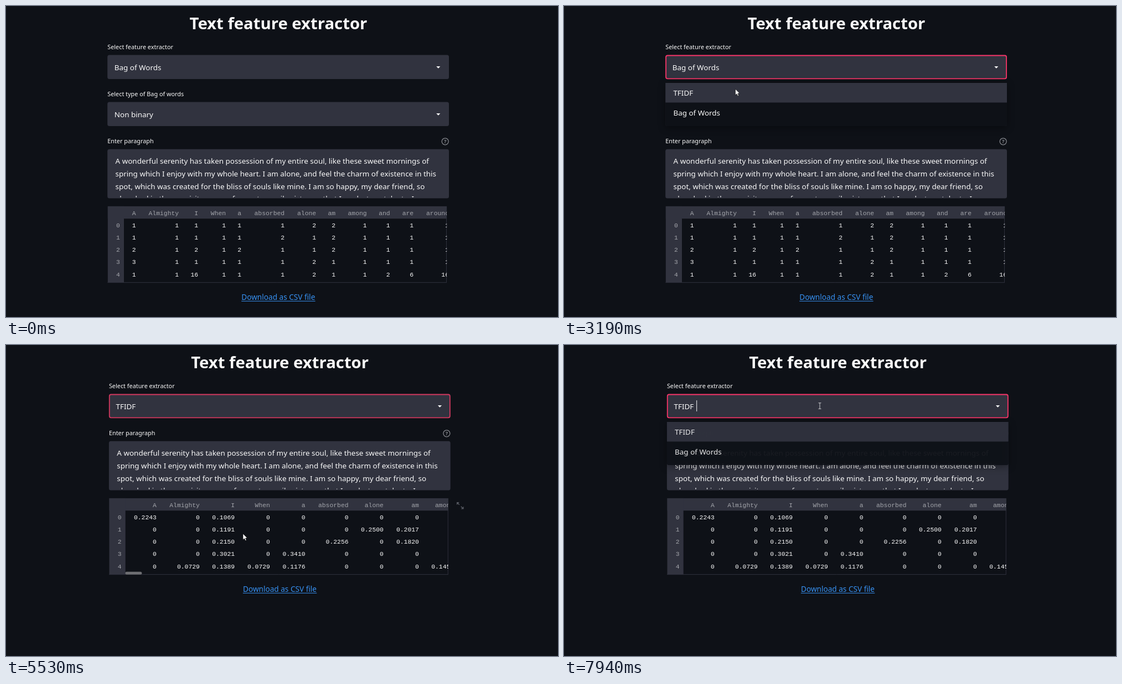
These frames come from a looping animation (997x562 px, 8000 ms). An HTML page with a canvas:

```html
<!DOCTYPE html>
<html lang="en">
<head>
<meta charset="utf-8">
<title>Text feature extractor</title>
<style>
html, body { margin: 0; width: 100%; height: 100%; overflow: hidden; background: #0e1117; }
canvas { display: block; }
</style>
</head>
<body>
<canvas id="stage" width="997" height="562"></canvas>
<script>
const ctx = document.getElementById('stage').getContext('2d');
const LOOP = 8000, LAYOUT_SWAP = 3980;
const SANS = '"Noto Sans", "Open Sans", sans-serif';
const MONO = '11.4px "Liberation Mono", "DejaVu Sans Mono", monospace';
const BODY = '13.45px ' + SANS, LABEL = '10.85px ' + SANS;
const BG = '#0e1117', PANEL = '#31333f', WHITE = '#fafafa', GREY = '#a3a5ab';

const paragraph = [
  'A wonderful serenity has taken possession of my entire soul, like these sweet mornings of',
  'spring which I enjoy with my whole heart. I am alone, and feel the charm of existence in this',
  'spot, which was created for the bliss of souls like mine. I am so happy, my dear friend, so',
  'absorbed in the exquisite sense of mere tranquil existence, that I neglect my talents. I'
];
const heads = 'A Almighty I When a absorbed alone am among and are around'.split(' ');

// Column right edges are relative to the left side of the page column.
const counts = {
  rights: [51.5, 129, 164, 214, 242, 320, 377, 412, 468.5, 510.5, 553, 616.8],
  rows: ['1 1 1 1 1 1 2 2 1 1 1 1', '1 1 1 1 1 2 1 2 1 1 1 1', '2 1 2 1 2 1 1 2 1 1 1 1',
         '3 1 1 1 1 1 2 1 1 1 1 1', '1 1 16 1 1 1 2 1 1 2 6 16'],
  thumb: 48
};
const weights = {
  rights: [86, 164, 227.3, 291, 354.7, 432.7, 496, 560, 623.3],
  rows: ['0.2243 0 0.1069 0 0 0 0 0 0', '0 0 0.1191 0 0 0 0.2500 0.2017 0',
         '0 0 0.2150 0 0 0.2256 0 0.1820 0', '0 0 0.3021 0 0.3410 0 0 0 0',
         '0 0.0729 0.1389 0.0729 0.1176 0 0 0 0.1459'],
  thumb: 30
};

// Pointer path: time, x, y.
const path = [
  [920, 940, 545], [1150, 760, 455], [1400, 540, 390], [1680, 405, 300],
  [2000, 350, 180], [2250, 328, 110], [2850, 328, 110], [3310, 303, 164],
  [4450, 303, 164], [4930, 420, 243], [5260, 420, 243], [5530, 428, 341],
  [5610, 428, 341], [6070, 440, 424], [6120, 440, 424], [6500, 444, 320],
  [6910, 449, 191], [7060, 449, 168], [7330, 449, 168], [7620, 462, 110], [8000, 462, 110]
];

const clamp = v => Math.max(0, Math.min(1, v));
const within = (t, a, b) => t >= a && t < b;

function pointerAt(t) {
  if (t < path[0][0]) return null;
  const i = path.findIndex(p => p[0] > t);
  const [t0, x0, y0] = path[i - 1], [t1, x1, y1] = path[i];
  const k = (t - t0) / (t1 - t0);
  return { x: x0 + (x1 - x0) * k, y: y0 + (y1 - y0) * k };
}

function text(str, x, y, font = BODY, color = WHITE, align = 'left') {
  ctx.font = font;
  ctx.fillStyle = color;
  ctx.textAlign = align;
  ctx.fillText(str, x, y);
}

function rect(x, y, w, h, color, r = 0) {
  ctx.fillStyle = color;
  ctx.beginPath();
  ctx.roundRect(x, y, w, h, r);
  ctx.fill();
}

function shape(points, color) {
  ctx.fillStyle = color;
  ctx.beginPath();
  points.forEach(([x, y]) => ctx.lineTo(x, y));
  ctx.closePath();
  ctx.fill();
}

function lines(color, width, ...segments) {
  ctx.strokeStyle = color;
  ctx.lineWidth = width;
  ctx.beginPath();
  for (const [x, y, x2, y2] of segments) {
    ctx.moveTo(x, y);
    ctx.lineTo(x2, y2);
  }
  ctx.stroke();
}

function select(x, y, value, border) {
  rect(x, y, 616.8, 43.5, PANEL, 3.5);
  if (border) {
    ctx.strokeStyle = border;
    ctx.lineWidth = 1.8;
    ctx.beginPath();
    ctx.roundRect(x + .9, y + .9, 615, 41.8, 3);
    ctx.stroke();
  }
  text(value, x + 12.6, y + 27);
  shape([[x + 594, y + 20.4], [x + 601.2, y + 20.4], [x + 597.6, y + 24.2]], WHITE);
}

function textarea(x, y) {
  text('Enter paragraph', x, y - 10.8, LABEL);
  ctx.strokeStyle = '#85878d';
  ctx.lineWidth = 1.3;
  ctx.beginPath();
  ctx.arc(x + 610, y - 14, 6, 0, 7);
  ctx.stroke();
  text('?', x + 610, y - 10.4, '600 9.5px ' + SANS, '#85878d', 'center');
  rect(x, y, 616.8, 88.8, PANEL, 3.5);
  ctx.save();
  ctx.beginPath();
  ctx.rect(x, y, 616, 87);
  ctx.clip();
  paragraph.forEach((line, i) => text(line, x + 14.4, y + 26.3 + i * 22.7));
  ctx.restore();
}

function table(x, y, data, hover) {
  ctx.save();
  ctx.beginPath();
  ctx.rect(x, y, 613, 139);
  ctx.clip();
  rect(x + .6, y, 613, 22.5, PANEL);
  rect(x + .6, y, 29.2, 138, PANEL);
  lines(PANEL, 1, [x, y + 137.9, x + 613, y + 137.9], [x + 612.4, y, x + 612.4, y + 138]);
  data.rights.forEach((r, i) => text(heads[i], x + r, y + 16, MONO, GREY, 'right'));
  data.rows.forEach((row, j) => {
    const base = y + 38.2 + j * 22.15;
    text(j, x + 22.6, base, MONO, GREY, 'right');
    row.split(' ').forEach((v, i) => text(v, x + data.rights[i], base, MONO, WHITE, 'right'));
  });
  if (hover) rect(x + 29.5, y + 133, data.thumb, 5, '#6d6e72', 2.5);
  ctx.restore();
  if (hover) expandIcon(x + 634.4, y + 13.5);
}

function expandIcon(x, y) {
  const color = '#555861';
  for (const s of [-1, 1]) {
    lines(color, 1.6, [x + s * 1.5, y + s * 1.5, x + s * 5, y + s * 5]);
    shape([[x + s * 6.3, y + s * 6.3], [x + s * 6.3, y + s * 1.4], [x + s * 1.4, y + s * 6.3]], color);
  }
}

function link(x, y) {
  const color = '#3791f2';
  text('Download as CSV file', x + 308.6, y, '13.6px ' + SANS, color, 'center');
  lines(color, 1, [x + 242, y + 2.5, x + 375.4, y + 2.5]);
}

function menu(x, alpha, active) {
  if (!alpha) return;
  ctx.save();
  ctx.globalAlpha = alpha;
  ctx.shadowColor = 'rgba(0,0,0,.4)';
  ctx.shadowBlur = 14;
  ctx.shadowOffsetY = 3;
  rect(x, 139, 616.8, 78, BG, 3);
  ctx.shadowColor = 'transparent';
  rect(x, 139 + active * 35.5, 616.8, 35.5, PANEL);
  ['TFIDF', 'Bag of Words'].forEach((s, i) => text(s, x + 14.2, 162 + i * 35.5, '500 ' + BODY));
  ctx.restore();
}

function pointer({ x, y }, beam, pressed) {
  if (pressed) {
    ctx.fillStyle = '#8f901c';
    ctx.beginPath();
    ctx.arc(x - 1, y - 1, 10.6, 0, 7);
    ctx.fill();
  }
  if (beam) {
    lines('#c9cacd', 1, [x, y - 5, x, y + 5], [x - 2.5, y - 5.3, x + 2.5, y - 5.3], [x - 2.5, y + 5.3, x + 2.5, y + 5.3]);
    return;
  }
  shape([[0, 0], [0, 11], [2.6, 8.7], [4.4, 12.6], [6.2, 11.8], [4.5, 8], [7.8, 7.8]]
    .map(([dx, dy]) => [x + dx, y + dy]), '#fff');
  ctx.strokeStyle = '#000';
  ctx.lineWidth = .6;
  ctx.stroke();
}

function draw(t) {
  const tfidf = t >= LAYOUT_SWAP;
  const x = tfidf ? 185.9 : 183.2, dy = tfidf ? -85 : 0;
  const areaY = 258.8 + dy, tableY = 361.8 + dy;
  const focused = t >= 2440;
  const first = within(t, 2440, 3690);
  const open = first ? clamp((t - 2440) / 200) * clamp((3690 - t) / 60) : clamp((t - 7756) / 200);
  const p = pointerAt(t);
  const over = (top, bottom) => p && p.x > x && p.x < x + 617 && p.y > top && p.y < bottom;
  const value = t < 3640 ? 'Bag of Words' : 'TFIDF';

  rect(0, 0, 997, 562, BG);
  text('Text feature extractor', x + 308.7, 42.3, 'bold 29.3px ' + SANS, WHITE, 'center');
  text('Select feature extractor', x, 78, LABEL);
  select(x, 88.6, value, focused && (open ? '#f63366' : '#d0365c'));

  // The caret restarts its blink whenever the field is clicked.
  const since = t >= 7690 ? t - 7690 : t >= 3780 ? t - 3780 : t - 2440;
  if (focused && since % 1060 < 530 || within(t, 3640, 3780)) {
    const cx = x + (value === 'TFIDF' ? 53.8 : 98);
    lines(WHITE, 1, [cx, 100, cx, 120]);
  }

  if (!tfidf) {
    text('Select type of Bag of words', x, 163, LABEL);
    select(x, 173.6, 'Non binary');
  }
  textarea(x, areaY);
  table(x, tableY, tfidf ? weights : counts, over(tableY, tableY + 138));
  link(x, 530.8 + dy);
  menu(x, open, first && t < 3150 ? 1 : 0);

  if (p) {
    const beam = over(88, 132) || (!open && (over(areaY, areaY + 89) || (!tfidf && over(173, 217))));
    const pressed = within(t, 2240, 2440) || within(t, 3510, 3640) || within(t, 7640, 7760);
    pointer(p, beam, pressed);
  }
}

const start = performance.now();
function tick() {
  draw(Math.min((performance.now() - start) % LOOP, 7940));
  requestAnimationFrame(tick);
}
tick();
</script>
</body>
</html>
```
